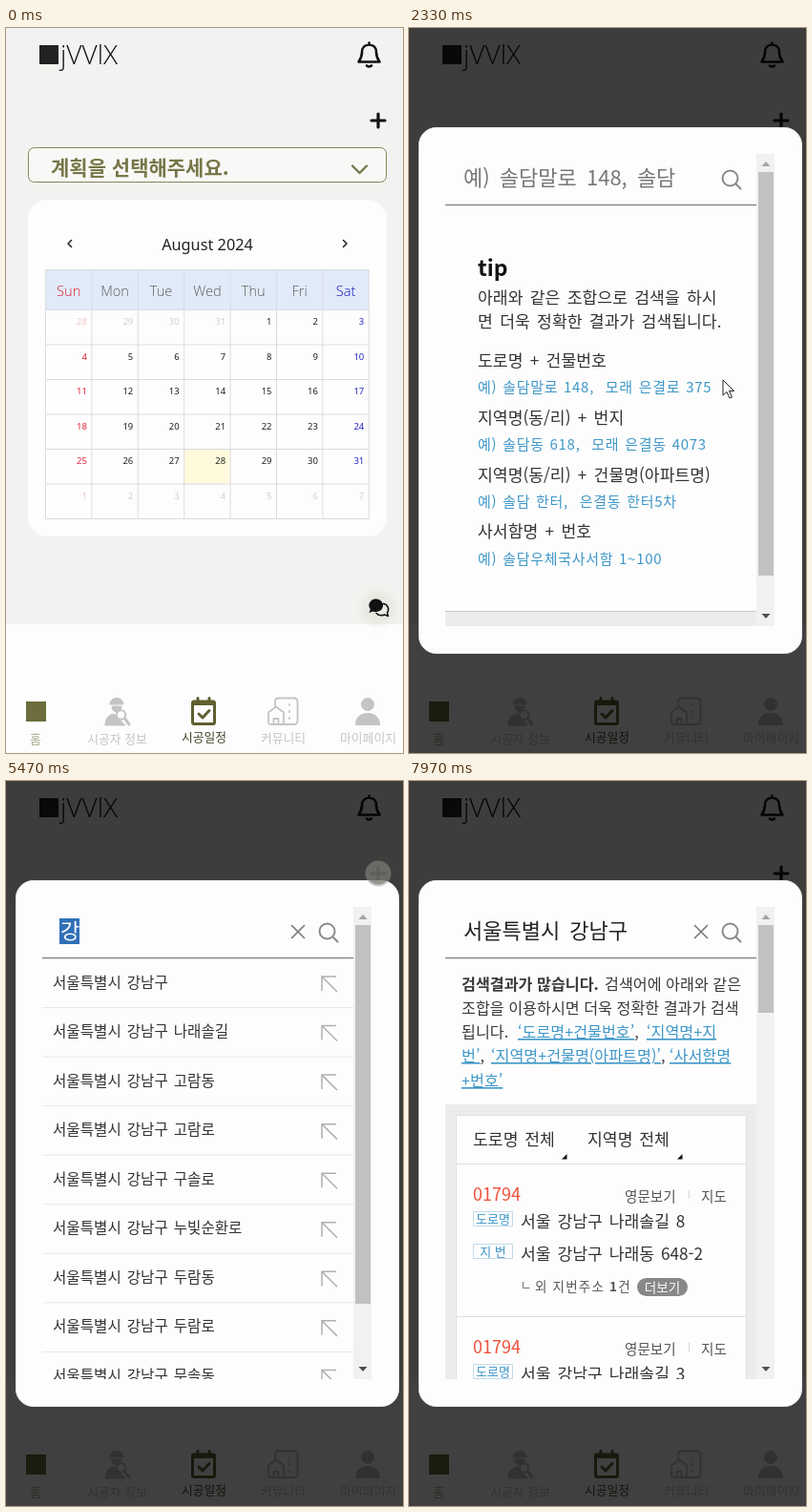
Recreate the animation shown at these times as an HTML page. Size 416 by 760 pixels, loop 8 s.

```html
<!DOCTYPE html>
<html lang="ko">
<head>
<meta charset="utf-8">
<title>시공일정</title>
<style>
  html, body { margin: 0; width: 100%; height: 100%; overflow: hidden; background: #fdfdfd; }
  svg { display: block; font-family: "Noto Sans CJK KR", "Noto Sans", sans-serif; }
  .en { font-family: "Open Sans", "Noto Sans", sans-serif; }
  .mid { text-anchor: middle; }
  .end { text-anchor: end; }
  .line { fill: none; stroke-linecap: round; stroke-linejoin: round; }

  .off { fill: #c4c4c2; stroke: #c4c4c2; }
  .nav text { font-size: 12.8px; text-anchor: middle; stroke: none; }

  .label { font-size: 15.2px; font-weight: 500; fill: #222; }
  .hint { font-size: 15.3px; fill: #85855c; }
  .field { fill: none; stroke: #dedede; }
  .dark { fill: #707046; }

  .query { font-size: 22px; word-spacing: 4px; fill: #222; }
  .query.ghost { fill: #777; }
  .tip text { font-size: 17.2px; word-spacing: 2.5px; fill: #333; }
  .tip .eg { font-size: 15px; letter-spacing: .7px; word-spacing: 1px; fill: #3f97c8; }
  .row { font-size: 15.6px; word-spacing: 1.6px; fill: #333; }
  .note { font-size: 16.2px; fill: #3a3a3a; }
  .note .link { fill: #3f97c8; text-decoration: underline; }
  .zip { font-size: 18px; fill: #f0503c; }
  .addr { font-size: 17.2px; word-spacing: 2px; fill: #333; }
  .tag { font-size: 13px; fill: #3f97c8; text-anchor: middle; }
  .small { font-size: 14.6px; fill: #555; }

  .dim { mix-blend-mode: multiply; animation: dim 8s step-end infinite; }
  .name { animation: focus 8s step-end infinite; }
  .dot { animation: dot 8s ease-in-out infinite; }
  .arrow { animation: arrow 8s ease-in-out infinite; }

  @keyframes dim { 0% { fill: #fff } 6.25% { fill: #808080 } 27.125%, to { fill: #404040 } }
  @keyframes focus { 0% { stroke: #dedede } 15%, to { stroke: #8f8f6c } }
  @keyframes dot {
    0%, 7.5% { transform: translate(390px, 97px) }
    13.1%, 21.2% { transform: translate(195px, 293px) }
    26%, 37.49% { transform: translate(335px, 369px) }
    37.5%, 83.7% { transform: translate(175px, 160px) }
    90%, to { transform: translate(150px, 211px) }
  }
  @keyframes arrow {
    0%, 31% { transform: translate(329px, 369px) }
    37%, to { transform: translate(175px, 160px) }
  }
</style>
</head>
<body>
<svg width="416" height="760" viewBox="0 0 416 760">
  <defs>
    <clipPath id="frame"><rect x="38" y="132" width="345" height="495"/></clipPath>
    <clipPath id="short"><rect x="55" y="140" width="235" height="40"/></clipPath>
    <clipPath id="long"><rect x="55" y="140" width="254" height="40"/></clipPath>
    <filter id="soft" x="-50%" y="-50%" width="200%" height="200%"><feGaussianBlur stdDeviation="3"/></filter>
    <g id="lens" class="line"><circle cx="336.5" cy="157.5" r="8"/><path d="M342.5 163.5l5 5"/></g>
    <path id="cross" class="line" d="M299.5 151.5l13 13m0-13l-13 13" stroke="#777" stroke-width="1.6"/>
    <path id="rule" d="M38 185.5H364" stroke="#888" stroke-width="1.5"/>
    <g id="bar">
      <rect x="364" y="132" width="19" height="495" fill="#f1f1f1"/>
      <path d="M369.5 145h9l-4.5-5z" fill="#a3a3a3"/>
      <path d="M369.5 614h9l-4.5 5z" fill="#505050"/>
    </g>
    <g id="touch"><g class="dot">
      <circle r="13.5" fill="#999" opacity=".5"/>
      <circle r="11.5" fill="#6c6c60" opacity=".55"/>
    </g></g>
  </defs>

  <!-- page -->
  <rect width="416" height="625" fill="#f2f2f0"/>
  <rect y="625" width="416" height="135" fill="#fdfdfd"/>
  <rect x="35" y="18" width="20" height="20" fill="#222"/>
  <text class="en" x="57" y="38" font-size="28" font-weight="300" fill="#111">jVVlX</text>
  <g class="line" stroke="#111" stroke-width="2.6">
    <path d="M380.5 15.5v2M369.5 35.5h22c-2.5-3.5-3.500-6-3.500-10c0-5-3-8-7.500-8s-7.500 3-7.500 8c0 4-1 6.500-3.500 10z"/>
    <path d="M378 39.5q2.5 2 5 0"/>
    <path d="M383 97h14M390 90v14" stroke-width="3.2"/>
  </g>

  <rect x="23.5" y="125.5" width="375" height="36" rx="6" fill="#f8f8f6" stroke="#85855a"/>
  <text x="47" y="154" font-size="21" font-weight="700" fill="#77774a">계획을 선택해주세요.</text>
  <path class="line" d="M363 144.5l7.5 7.5l7.5-7.5" stroke="#77774a" stroke-width="2.4"/>

  <rect x="23" y="180" width="376" height="353" rx="20" fill="#fdfdfd"/>
  <path class="line" d="M68.5 222.5l-3.5 3.5l3.5 3.5M353.5 222.5l3.5 3.5l-3.5 3.5" stroke="#222" stroke-width="1.5"/>
  <text class="mid" x="211" y="233" font-size="16.3" fill="#222" font-family="Noto Sans, sans-serif">August 2024</text>
  <g id="cal"></g>

  <circle cx="390" cy="608" r="18" fill="#e9e9e2" filter="url(#soft)"/>
  <g fill="#111">
    <path d="M395 603.5a6 6 0 0 1 4.5 9.5l1 3.5l-4-1.5a7 6 0 0 1-8.5-1.5" class="line" stroke="#111" stroke-width="1.5"/>
    <path d="M387.5 598.5a7.5 6.8 0 1 1-3 13l-4 1.5l1.3-3.7a7.5 6.8 0 0 1 5.7-10.8z"/>
  </g>

  <g class="nav">
    <rect x="21" y="706" width="21" height="21" fill="#6c6c3c"/>
    <text x="31" y="750" fill="#a6a68c">홈</text>
    <g class="off">
      <path d="M109 709c0-4 3-6.5 7-6.5s7 2.5 7 6.5zM111 711h10c0 8-10 8-10 0zM104 731c0-8 4-11 9-12l12 12z" stroke-width="1"/>
      <circle class="line" cx="120.5" cy="720" r="4.8" stroke-width="2" style="fill:#fdfdfd"/>
      <path class="line" d="M124.5 724l4.5 6" stroke-width="3"/>
      <text x="116.5" y="750">시공자 정보</text>
    </g>
    <g class="line" stroke="#5f5f30" stroke-width="3">
      <rect x="195.5" y="706" width="23" height="23.5" rx="1.5"/>
      <path d="M195.5 708.5h23M201 702.5v4M213 702.5v4M202 719l4 4l7-7.5"/>
    </g>
    <text x="207.5" y="748" fill="#44442c">시공일정</text>
    <g class="off">
      <path class="line" d="M282 711v-5q0-3.5 3.5-3.5h16q4 0 4 4v20q0 3.5-4 3.5h-12M275 717.5l8-6l8 6v10q0 2.5-3 2.5h-10q-3 0-3-2.5zM280.5 730v-6h5v6M297 709v1M297 716v1M297 723v1" stroke-width="1.8"/>
      <text x="290.5" y="749">커뮤니티</text>
      <circle cx="379" cy="709" r="6.5"/>
      <path d="M366.5 730.5c0-8 5-12 12.5-12s12.5 4 12.5 12z"/>
      <text x="379.5" y="749">마이페이지</text>
    </g>
  </g>

  <rect class="dim" width="416" height="760"/>

  <!-- dialog -->
  <rect data-on="500 8000" x="10.5" y="104.5" width="401" height="551" rx="18" fill="#fdfdfd" stroke="#eee"/>
  <g data-on="500 2170">
    <text class="mid" x="211" y="209" font-size="21.3" font-weight="700" fill="#111">계획 정보를 입력해주세요</text>
    <text class="label" x="38" y="251">이름</text>
    <text class="label" x="38" y="335">주소</text>
    <text class="label" x="38" y="467">메모</text>
    <rect class="field name" x="38.5" y="266" width="345" height="36" rx="7"/>
    <rect class="field" x="38.5" y="351.5" width="229" height="36" rx="7"/>
    <rect class="field" x="38.5" y="397.5" width="345" height="36" rx="7"/>
    <rect class="field" x="38.5" y="482.5" width="345" height="36" rx="7"/>
    <text class="hint" x="48" y="374">우편번호</text>
    <text class="hint" x="48" y="421">기본 주소를 입력하세요.</text>
    <text class="hint" x="48" y="506">공유 메모를 작성해주세요.</text>
    <rect class="dark" x="286" y="351" width="98" height="37" rx="6"/>
    <text class="mid" x="335" y="375" font-size="15.6" fill="#fdfdfd">우편번호 찾기</text>
    <rect x="123" y="537" width="74" height="37" rx="6" fill="#e8e8da"/>
    <text class="mid" x="160" y="560" font-size="15.3" fill="#333">취소</text>
    <rect class="dark" x="224" y="537" width="74" height="37" rx="6"/>
    <text class="mid" x="261" y="560" font-size="15.3" fill="#fdfdfd">등록</text>
    <g font-size="15.3" fill="#333">
      <text data-on="1330 1400" x="48" y="289">ㅈ</text>
      <text data-on="1400 1450" x="48" y="289">지</text>
      <text data-on="1450 2170" x="48" y="289">집</text>
    </g>
    <path data-on="1200 1330" d="M48.5 276v17" stroke="#333"/>
    <path data-on="1330 1950" d="M63.5 276v17" stroke="#333"/>
  </g>

  <g clip-path="url(#frame)">
    <!-- search tips -->
    <g data-on="2240 3000">
      <g clip-path="url(#short)"><text class="query ghost" x="57" y="165">예) 솔담말로 148, 솔담 한터</text></g>
      <use href="#lens" stroke="#8a8a8a" stroke-width="2"/>
      <use href="#rule"/>
      <g class="tip">
        <text x="72" y="260" style="font-size:23px;font-weight:700;fill:#111">tip</text>
        <text x="72" y="289">아래와 같은 조합으로 검색을 하시</text>
        <text x="72" y="314">면 더욱 정확한 결과가 검색됩니다.</text>
        <text x="72" y="355">도로명 + 건물번호</text>
        <text x="72" y="382" class="eg">예) 솔담말로 148,&#160; 모래 은결로 375</text>
        <text x="72" y="415">지역명(동/리) + 번지</text>
        <text x="72" y="442" class="eg">예) 솔담동 618,&#160; 모래 은결동 4073</text>
        <text x="72" y="475">지역명(동/리) + 건물명(아파트명)</text>
        <text x="72" y="502" class="eg">예) 솔담 한터,&#160; 은결동 한터5차</text>
        <text x="72" y="534">사서함명 + 번호</text>
        <text x="72" y="562" class="eg">예) 솔담우체국사서함 1~100</text>
      </g>
      <rect x="38" y="611" width="326" height="16" fill="#ececec"/>
      <path d="M38 611.5H364" stroke="#c8c8c8"/>
      <use href="#bar"/>
      <rect x="366" y="151" width="16" height="423" fill="#c1c1c1"/>
    </g>

    <!-- focused search box -->
    <g data-on="3000 4870">
      <rect x="38" y="186" width="345" height="441" fill="#ececec"/>
      <path d="M38 185.5H383" stroke="#777" stroke-width="1.5"/>
      <use href="#lens" x="20" y="0.5" stroke="#8f8f8f" stroke-width="1.7"/>
    </g>
    <g clip-path="url(#long)"><text data-on="3000 4500" class="query ghost" x="57" y="165">예) 솔담말로 148, 솔담 한터</text></g>
    <path data-on="3070 3600" d="M56.5 144v27" stroke="#222"/>
    <path data-on="4130 4500" d="M56.5 144v27" stroke="#222"/>
    <text data-on="4500 4770" class="query en" x="56" y="166" style="font-size:19px">r</text>
    <path data-on="4500 4770" d="M62.5 144v27" stroke="#222"/>

    <!-- suggestions -->
    <g data-on="4870 7470">
      <g id="rows"></g>
      <use href="#cross"/>
      <use href="#lens" stroke="#8a8a8a" stroke-width="2"/>
      <use href="#rule"/>
      <use href="#bar"/>
      <rect x="366" y="151" width="16" height="397" fill="#c1c1c1"/>
    </g>
    <rect data-on="4770 5800" x="56" y="144" width="21" height="27" fill="#3070b8"/>
    <rect data-on="5800 7470" x="76.5" y="144" width="21" height="27" fill="#3070b8"/>
    <text data-on="5800 7470" class="query" x="57" y="165">강</text>
    <g id="ime" class="query" style="fill:#fff"></g>

    <!-- results -->
    <g data-on="7470 8000">
      <text class="query" x="57" y="165">서울특별시 강남구</text>
      <use href="#cross"/>
      <use href="#lens" stroke="#8a8a8a" stroke-width="2"/>
      <use href="#rule"/>
      <g class="note">
        <text x="55" y="219" font-weight="700">검색결과가 많습니다.</text>
        <text x="205" y="219">검색어에 아래와 같은</text>
        <text x="55" y="244">조합을 이용하시면 더욱 정확한 결과가 검색</text>
        <text x="55" y="269">됩니다.</text>
        <text x="114" y="269"><tspan class="link">‘도로명+건물번호’</tspan>,</text>
        <text x="249" y="269" class="link">‘지역명+지</text>
        <text x="55" y="294"><tspan class="link">번’</tspan>,</text>
        <text x="86" y="294"><tspan class="link">‘지역명+건물명(아파트명)’</tspan>,</text>
        <text x="273" y="294" class="link">‘사서함명</text>
        <text x="55" y="320" class="link">+번호’</text>
      </g>
      <rect x="38" y="339" width="345" height="288" fill="#ececec"/>
      <rect x="49.5" y="350.5" width="304" height="290" fill="#fdfdfd" stroke="#e0e0e0"/>
      <path d="M50 401.5H353M50 561.5H353" stroke="#e0e0e0"/>
      <text class="addr" x="67" y="382">도로명 전체</text>
      <text class="addr" x="187" y="382">지역명 전체</text>
      <path d="M165.5 391v5.5h-5.5zM286.5 391v5.5h-5.5z" fill="#111"/>
      <g id="hits"></g>
      <rect x="67.5" y="485.5" width="41" height="15" fill="none" stroke="#c4dcea"/>
      <text class="tag" x="88" y="498">지 번</text>
      <text class="addr" x="117" y="502">서울 강남구 나래동 648-2</text>
      <path d="M119.5 525v6.5h7" fill="none" stroke="#777"/>
      <text class="small" x="132" y="535" style="font-size:13.5px;letter-spacing:1.2px">외 지번주소 <tspan font-weight="700">1</tspan>건</text>
      <rect x="239" y="521" width="53" height="19" rx="9.5" fill="#888"/>
      <text class="mid" x="265.5" y="535.5" font-size="13.5" fill="#fdfdfd">더보기</text>
      <use href="#bar"/>
      <rect x="366" y="151" width="16" height="92" fill="#c1c1c1"/>
    </g>
  </g>

  <!-- pointer -->
  <g data-on="500 2170"><use href="#touch"/></g>
  <g data-on="3000 7470"><use href="#touch"/></g>
  <g data-on="2170 3000">
    <path class="arrow" d="M0 0v16l4-3.5l3 6.5l2.5-1l-3-6.5h5z" fill="#fff" stroke="#222"/>
  </g>
</svg>
<script>
  const add = (id, html) => document.getElementById(id).insertAdjacentHTML('beforeend', html);

  // Calendar
  const colW = 48.4, rowH = 36.5, gridX = 41.5, gridY = 295.5, gridEnd = 380.3;
  add('cal', `<rect x="41" y="253" width="339.5" height="42" fill="#e0eaf8"/>
    <rect x="${gridX + 3 * colW}" y="${gridY + 4 * rowH}" width="${colW}" height="${rowH}" fill="#fffadc"/>`);
  let grid = `M41 253.5H${gridEnd}`;
  for (let i = 0; i < 8; i++) grid += `M${gridX + i * colW} 253.5V514.5`;
  for (let i = 0; i < 7; i++) grid += `M41 ${gridY + i * rowH}H${gridEnd}`;
  add('cal', `<path d="${grid}" fill="none" stroke="#dcdce0"/>`);
  const tint = (col, sun, week, sat) => col === 0 ? sun : col === 6 ? sat : week;
  ['Sun', 'Mon', 'Tue', 'Wed', 'Thu', 'Fri', 'Sat'].forEach((day, c) =>
    add('cal', `<text class="en mid" x="${gridX + (c + .5) * colW}" y="281" font-size="14.6"
      font-weight="300" fill="${tint(c, '#e81c30', '#5c5c5c', '#1414c0')}">${day}</text>`));
  for (let i = 0; i < 42; i++) {
    const date = new Date(2024, 6, 28 + i), c = i % 7, r = (i - c) / 7;
    const color = date.getMonth() === 7 ? tint(c, '#e02838', '#222', '#2828c8') : tint(c, '#f0c8c8', '#cfcfcf', '#ccccd8');
    add('cal', `<text class="end" x="${gridX + (c + 1) * colW - 5}" y="${311 + r * rowH}" font-size="9.5"
      font-family="Noto Sans, sans-serif" fill="${color}">${date.getDate()}</text>`);
  }

  // Suggestions
  ['', '나래솔길', '고람동', '고람로', '구솔로', '누빛순환로', '두람동', '두람로', '무솔동'].forEach((road, i) => {
    const y = 51.55 * i;
    add('rows', `<text class="row" x="49" y="${216.5 + y}">서울특별시 강남구 ${road}</text>
      <path d="M331 ${220 + y}v-15h15M331 ${205 + y}l16 16" fill="none" stroke="#b0b0b0" stroke-width="1.5"/>
      <path d="M38 ${237.5 + y}H364" stroke="#e8e8e8"/>`);
  });

  // Syllables being composed: text, x, from, to
  [['ㄱ', 57, 4770, 4870], ['가', 57, 4870, 5130], ['강', 57, 5130, 5800],
   ['ㄴ', 77, 5800, 6000], ['나', 77, 6000, 6300], ['남', 77, 6300, 7470]].forEach(([s, x, from, to]) =>
    add('ime', `<text data-on="${from} ${to}" x="${x}" y="165">${s}</text>`));

  // Search hits
  ['서울 강남구 나래솔길 8', '서울 강남구 나래솔길 3'].forEach((addr, i) => {
    add('hits', `<g transform="translate(0 ${i * 160})">
      <text class="zip" x="67" y="440">01794</text>
      <text class="small" x="226" y="441">영문보기</text>
      <path d="M293.5 429v9" stroke="#d8d8d8"/>
      <text class="small" x="306" y="441">지도</text>
      <rect x="67.5" y="451.5" width="41" height="15" fill="none" stroke="#c4dcea"/>
      <text class="tag" x="88" y="464">도로명</text>
      <text class="addr" x="117" y="468">${addr}</text></g>`);
  });

  // Show each timed part between its two times (ms)
  const sheet = document.head.appendChild(document.createElement('style'));
  let rules = '';
  document.querySelectorAll('[data-on]').forEach((el, i) => {
    const [from, to] = el.dataset.on.split(' ').map(ms => ms / 80);
    const leave = to < 100 ? `${to}%,to{opacity:0}` : 'to{opacity:1}';
    rules += `@keyframes on${i}{0%{opacity:0}${from}%{opacity:1}${leave}}`;
    el.style.animation = `on${i} 8s step-end infinite`;
  });
  sheet.textContent = rules;
</script>
</body>
</html>
```
